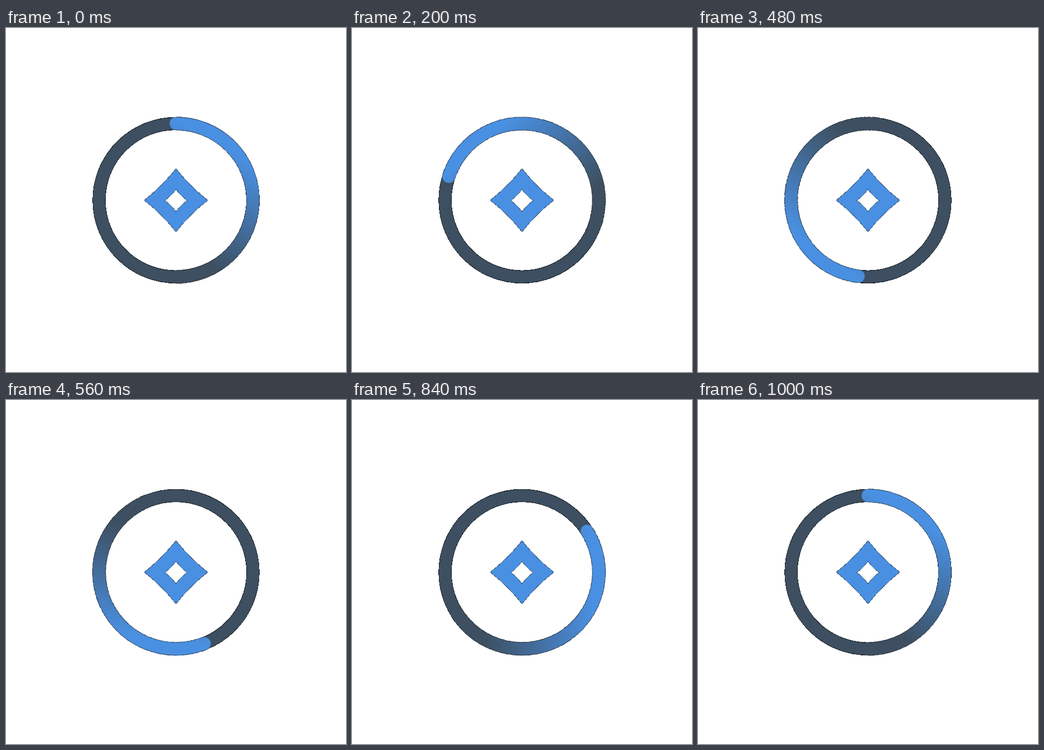
An HTML page that plays this animation: 634 by 644 pixels, repeating every 1.04 s.

```html
<!DOCTYPE html>
<html lang="en">
<head>
<meta charset="utf-8">
<title>Loading ring</title>
<style>
  html, body { margin: 0; width: 100%; height: 100%; overflow: hidden; background: #fff; }
  svg { display: block; width: 634px; height: 644px; }
  .ring { fill: none; stroke: #3d4f60; stroke-width: 23.4; }
  .arc { stroke: url(#fade); stroke-linecap: round; stroke-width: 23.8; }
  .gem { fill: #4a90e2; fill-rule: evenodd; }
  /* hard dark rims that show just past the smooth shapes above them */
  .rim { stroke: #000; stroke-linejoin: round; shape-rendering: crispEdges; }
  .ring.rim { stroke-width: 24.5; }
  .sweep .rim { stroke-width: 25; }
  /* 25 steps make one full turn; the last step rests at the start pose */
  .sweep { animation: turn 1040ms steps(26, end) infinite; }
  @keyframes turn {
    from { transform: rotate(0deg); }
    to { transform: rotate(-374.4deg); }
  }
</style>
</head>
<body>
<svg viewBox="0 0 634 644">
  <defs>
    <linearGradient id="fade" gradientUnits="userSpaceOnUse" x1="65" y1="-113" x2="-38" y2="66">
      <stop offset="0" stop-color="#4a90e2"/>
      <stop offset="1" stop-color="#3d4f60"/>
    </linearGradient>
    <path id="half" d="M0-143.5A143.5 143.5 0 0 1 0 143.5"/>
    <path id="gem" d="M0-59Q26-26 59 0Q26 26 0 59Q-26 26-59 0Q-26-26 0-59Z
      M0-20.5Q9-8 21 .6Q9 9.2 0 21.7Q-9 9.2-21 .6Q-9-8 0-20.5Z"/>
  </defs>
  <g transform="translate(317 322.4)">
    <circle class="ring rim" r="143.5"/>
    <g class="sweep"><use class="ring rim" href="#half"/></g>
    <circle class="ring" r="143.5"/>
    <g class="sweep"><use class="ring arc" href="#half"/></g>
    <use class="gem rim" href="#gem"/>
    <use class="gem" href="#gem"/>
  </g>
</svg>
</body>
</html>
```
